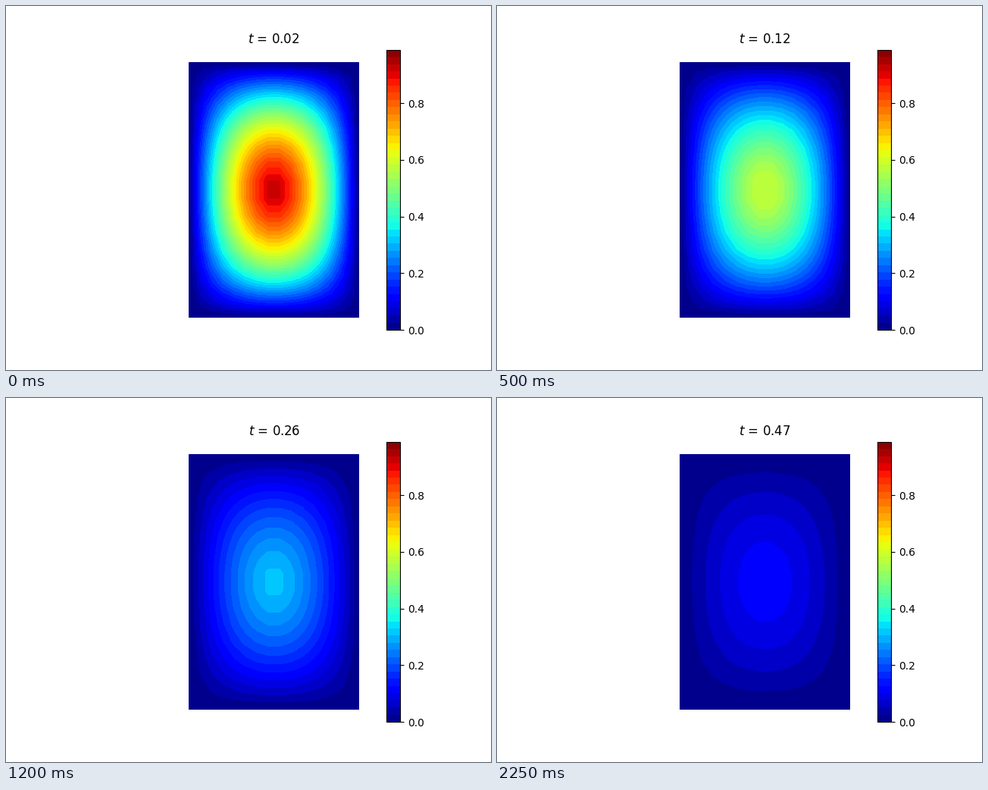
Animation of 640x480 px, one loop 2300 ms. Source, as a matplotlib script:

```python
import numpy as np
import matplotlib.pyplot as plt
from matplotlib.animation import FuncAnimation
from matplotlib.tri import Triangulation

WIDTH, HEIGHT = 2.0, 3.0
CELLS = 15
FRAMES, INTERVAL = 46, 50
T_START, DT = 0.02, 0.01
DECAY = 4.5
U_MAX = 0.989
LEVELS = np.linspace(0, U_MAX, 40)


def rectangle_mesh(n):
    """Regular mesh whose cells are split from top left to bottom right."""
    x, y = np.meshgrid(np.linspace(0, WIDTH, n + 1), np.linspace(0, HEIGHT, n + 1))
    node = np.arange((n + 1) ** 2).reshape(n + 1, n + 1)
    a, b = node[:-1, :-1].ravel(), node[:-1, 1:].ravel()
    c, d = node[1:, :-1].ravel(), node[1:, 1:].ravel()
    triangles = np.vstack([np.column_stack([a, b, c]), np.column_stack([b, d, c])])
    return Triangulation(x.ravel(), y.ravel(), triangles)


mesh = rectangle_mesh(CELLS)
mode = np.sin(np.pi * mesh.x / WIDTH) * np.sin(np.pi * mesh.y / HEIGHT)
mode = np.clip(mode, 1e-7, 1)
profile = 1.02 * (0.92 * mode + 0.08 * mode ** 12)

fig, ax = plt.subplots(figsize=(6.4, 4.8), dpi=100)
ax.set_aspect("equal")
ax.axis("off")


def draw_field(t):
    field = ax.tricontourf(mesh, profile * np.exp(-DECAY * t),
                           levels=LEVELS, cmap="jet")
    ax.set_xlim(-0.05 * WIDTH, 1.05 * WIDTH)
    ax.set_ylim(-0.05 * HEIGHT, 1.05 * HEIGHT)
    return field


contours = draw_field(T_START)
fig.colorbar(contours, ax=ax, ticks=np.arange(0, 0.9, 0.2), format="%.1f")
title = ax.set_title("")


def update(i):
    global contours
    contours.remove()
    t = T_START + DT * i
    contours = draw_field(t)
    title.set_text(f"$t$ = {t:.2f}")
    return contours, title


anim = FuncAnimation(fig, update, frames=FRAMES, interval=INTERVAL,
                     init_func=lambda: [], repeat=True, repeat_delay=0)
plt.show()
```
